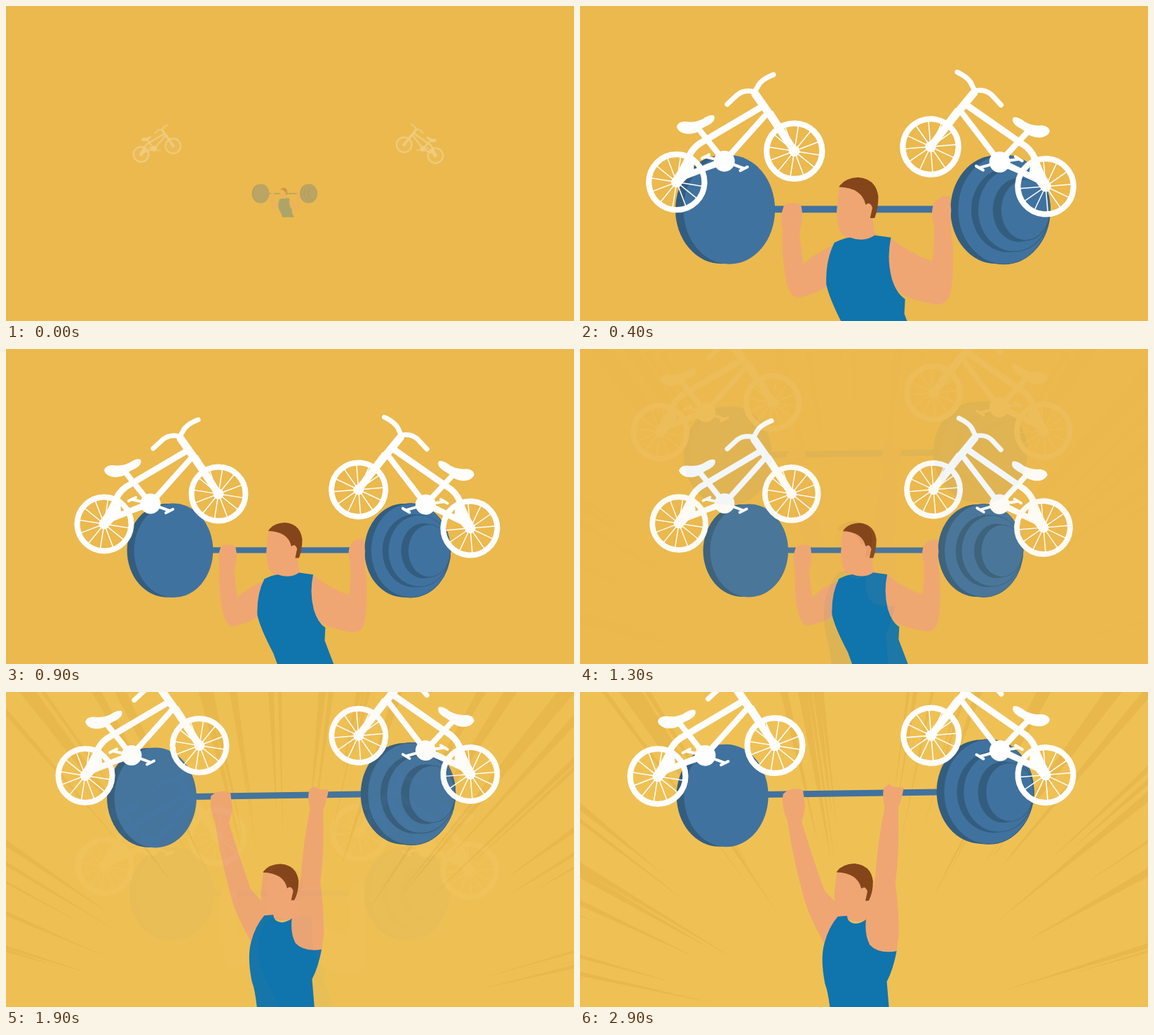
These frames come from a looping animation (810 px wide and 450 px high, 3400 ms). An HTML page:

```html
<!DOCTYPE html>
<html lang="en">
<head>
<meta charset="utf-8">
<title>Weightlifter with bikes</title>
<style>
  html, body { margin: 0; width: 100%; height: 100%; overflow: hidden; background: #ebb94e; }
  svg { display: block; width: 810px; height: 450px; }
  .line { fill: none; stroke: #fff; stroke-linecap: round; stroke-linejoin: round; }
  .steel { fill: #40729f; }
  .edge { fill: #335d7f; }
  .rim { fill: #40729f; stroke: #335d7f; stroke-width: 1; }
  .skin { fill: #efa673; }
  .shirt { fill: #1074ad; }
  .hair { fill: #84451a; }
</style>
</head>
<body>
<svg viewBox="0 0 810 450">
  <defs>
    <g id="wheel">
      <circle class="line" r="38.5" stroke-width="8"/>
      <path class="line spokes" stroke-width="1.5"/>
      <circle r="7.5" fill="#fff"/>
    </g>
    <!-- rear axle at 0,0 -->
    <g id="bike">
      <use href="#wheel"/>
      <use href="#wheel" x="163" y="-43"/>
      <path class="line" stroke-width="7" d="M134 -149 Q116 -142 112 -132 L108 -125 Q94 -129 84 -121 L70 -108"/>
      <path class="line" stroke-width="11" d="M109 -122 L128 -95"/>
      <path fill="#fff" d="M121 -96 L133 -99 L167 -46 L159 -40Z"/>
      <path class="line" stroke-width="9" d="M117 -104 L31 -53 Q20 -45 15 -31 L0 -2"/>
      <path class="line" stroke-width="8" d="M124 -94 L66 -29 L31 -73"/>
      <path fill="#fff" d="M64 -34 L24 -18 L22 -46 L-6 -4 L3 7 L16 -7 L68 -25Z"/>
      <path fill="#fff" d="M0 -77 Q2 -84 12 -84 Q24 -82 35 -87 Q47 -95 52 -92 Q55 -85 44 -79 Q36 -76 30 -70 Q18 -65 9 -68 Q1 -71 0 -77Z"/>
      <circle cx="66" cy="-29" r="14.5" fill="#fff"/>
      <path class="line" stroke-width="4" d="M93 -19 L66 -29 L40 -35 M35 -33 L45 -38 M88 -16 L98 -21"/>
    </g>
    <g id="bikeL"><use href="#bike" transform="translate(140 250)"/></g>
    <g id="bikeR"><use href="#bike" transform="translate(662 256) scale(-1 1) rotate(-4.3)"/></g>
    <g id="plateL">
      <ellipse class="edge" cx="213" cy="289.5" rx="62" ry="73"/>
      <ellipse class="steel" cx="223.5" cy="289.5" rx="61.5" ry="73.5"/>
    </g>
    <g id="plateR">
      <ellipse class="edge" cx="582" cy="289.5" rx="61" ry="73"/>
      <ellipse class="rim" cx="593" cy="289.5" rx="62" ry="73.5"/>
      <ellipse class="edge" cx="599" cy="290" rx="50" ry="57"/>
      <ellipse class="rim" cx="606.5" cy="290" rx="48.5" ry="56"/>
      <ellipse class="edge" cx="613" cy="290" rx="35" ry="43"/>
      <ellipse class="rim" cx="622" cy="290" rx="33" ry="41"/>
    </g>
    <g id="head">
      <path class="skin" d="M372 258 Q369 275 368 292 Q369 312 373 320 Q378 328 386 328 Q404 336 420 325 L416 300 L418 258Z"/>
      <path class="hair" d="M371 259 Q378 247 397 246 Q421 248 424 272 Q424 288 419 301 L413 301 L416 287 Q413 278 407 283 Q402 260 371 259Z"/>
    </g>
  </defs>

  <g id="low">
    <rect width="810" height="450" fill="#ebb94e"/>
    <g id="man1">
      <path class="steel" d="M280 284.5H525V293.5H280Z"/>
      <use href="#plateL"/><use href="#plateR"/>
      <path class="skin" d="M297 284 Q308 277 320 283 Q324 300 318 320 Q320 345 323 363 Q342 345 366 337 L360 390 Q335 406 314 408 Q303 404 299 380 Q294 350 295 318 Q291 300 297 284Z"/>
      <path class="skin" d="M500 279 Q508 270 520 272 L522 290 Q520 310 524 335 Q526 385 520 405 Q516 418 502 417 Q475 413 456 404 Q440 390 436 365 Q434 345 439 327 Q470 350 497 359 Q500 335 499 310 Q493 292 500 279Z"/>
      <use href="#head"/>
      <path class="shirt" d="M365 334 Q376 328 386 327 Q405 334 419 324 L441 327 Q435 355 442 382 Q448 402 460 410 L459 430 L475 472 L387 472 L379 450 Q358 410 354 390 Q353 357 365 334Z"/>
    </g>
    <use id="left1" href="#bikeL"/><use id="right1" href="#bikeR"/>
  </g>

  <g id="high">
    <rect width="810" height="450" fill="#efc155"/>
    <path id="rays" fill="#e9b84c"/>
    <g id="man2">
      <path class="steel" d="M265 143.5L510 140V149L265 152.5Z"/>
      <use href="#plateL" transform="translate(205.5 149.5) scale(.965 .985) translate(-218 -289.5)"/>
      <use href="#plateR" transform="translate(575.5 144) scale(1.02 1.005) translate(-588 -289.5)"/>
      <path class="skin" d="M291 147 Q303 136 319 142 L322 165 Q320 178 317 186 Q335 245 349 283 L365 300 L370 322 Q358 340 349 358 Q330 325 322 300 Q305 240 297 185 Q288 165 291 147Z"/>
      <use href="#head" transform="translate(5 9) scale(.973 .96)"/>
      <path class="shirt" d="M368 320 L381 319 Q382 330 395 330 Q404 328 409 323 L420 350 L451 368 Q446 395 437 412 L442 472 L359 472 Q356 430 350 415 Q343 380 349 358 Q355 335 368 320Z"/>
      <path class="skin" d="M433 138 L440 133 L446 137 L461 138 Q458 155 453 167 Q455 230 449 272 Q454 310 454 345 L451 369 Q425 373 413 360 Q405 345 408 322 L411 299 Q418 285 421 262 Q424 215 434 166 Q430 150 433 138Z"/>
    </g>
    <g id="left2"><use href="#bike" transform="translate(112 120) scale(1.012)"/></g>
    <g id="right2"><use href="#bike" transform="translate(663 118) scale(-1.012 1.012) rotate(-4.3)"/></g>
  </g>
</svg>
<script>
const LOOP = 3400, STEP = 100, LAST = 29;
const $ = id => document.getElementById(id);

// scale per step while the parts pop in; the last value holds
const bikePop = [.28, .9, 1.245, 1.17, 1.03, .97, 1, 1.01, 1.008, 1, .99, .985];
const manPop = [.185, .6, .927, 1.04, 1.06, 1.04, 1, .96, .93, .915, .907, .905];
const rayAngles = [-167, -153, -145, -128, -120, -101, -95, -81, -73, -58, -50, -40, -33, -15];

const at = (list, i) => list[Math.min(i, list.length - 1)];

function zoom(id, x, y, s) {
  $(id).setAttribute("transform", `translate(${x} ${y}) scale(${s}) translate(${-x} ${-y})`);
}

function random(seed) {
  return () => {
    seed = (seed * 16807) % 2147483647;
    return seed / 2147483647;
  };
}

function rayPath(seed) {
  const rnd = random(seed * 7919 + 13);
  const point = (r, a) => `${(400 + r * Math.cos(a)).toFixed(1)} ${(490 + r * Math.sin(a)).toFixed(1)}`;
  let d = "";
  for (const deg of rayAngles) {
    for (let k = 0; k < 3; k++) {
      const a = (deg + (rnd() - .5) * 9) * Math.PI / 180;
      const w = .005 + rnd() * .013;
      const tip = 200 + rnd() * 210;
      d += `M${point(tip, a)}L${point(720, a - w)}L${point(720, a + w)}Z`;
    }
  }
  return d;
}

function draw(step) {
  const t = step * STEP;
  const bike = at(bikePop, step);
  const drift = Math.min(step, 13);
  zoom("man1", 396 + drift * 1.1, 263 + drift * .8, at(manPop, step));
  zoom("left1", 213, 197, bike);
  zoom("right1", 593, 197, bike);
  for (const id of ["man1", "left1", "right1"]) $(id).setAttribute("opacity", step ? 1 : .28);

  const fade = t < 1300 ? 0 : Math.min(1, .06 + (t - 1300) * .91 / 600);
  $("high").setAttribute("opacity", fade);
  if (!fade) return;
  const s = 1 + (t - 2400) * .000025;
  zoom("man2", 395, 265, s);
  zoom("left2", 195, 75, s);
  zoom("right2", 583, 72, s);
  $("rays").setAttribute("d", rayPath(step));
}

let spokes = "";
for (let i = 0; i < 12; i++) {
  const a = (i + .3) * Math.PI / 6;
  spokes += `M0 0L${36 * Math.cos(a)} ${36 * Math.sin(a)}`;
}
document.querySelector(".spokes").setAttribute("d", spokes);

const start = performance.now();
let shown = -1;
function tick() {
  const t = (performance.now() - start) % LOOP;
  const step = Math.min(LAST, Math.floor(t / STEP));
  if (step !== shown) draw(shown = step);
  requestAnimationFrame(tick);
}
tick();
</script>
</body>
</html>
```
